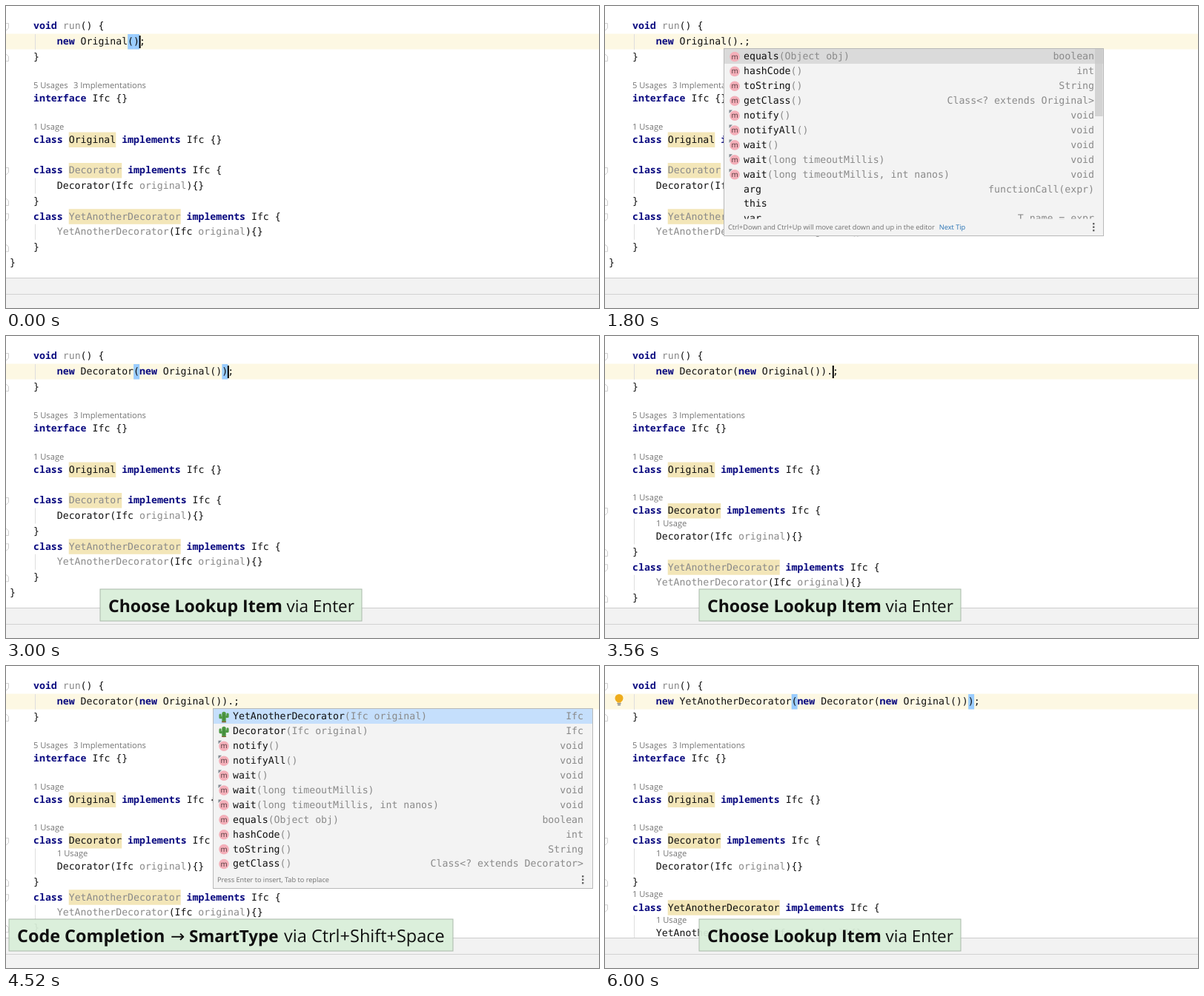
These frames come from a looping animation (800 px wide and 408 px high, 6280 ms). An HTML page:

```html
<!DOCTYPE html>
<html lang="en">
<head>
<meta charset="utf-8">
<title>Smart completion</title>
<style>
  html, body { margin: 0; width: 100%; height: 100%; overflow: hidden; background: #fff; }
  svg { display: block; }
  text { white-space: pre; text-rendering: geometricPrecision; fill: #101010; }
  .code { font: 13.2px "DejaVu Sans Mono", monospace; }
  .ui { font-family: "Open Sans", "DejaVu Sans", sans-serif; }
  .kw { font: 700 13.25px "Noto Sans Mono", "DejaVu Sans Mono", monospace; fill: #0a0a80; }
  .dim { fill: #8a8a8a; }
  .hint { font-size: 11.15px; fill: #757575; }
  .tip { font-size: 9.2px; fill: #707070; }
  .link { fill: #2470b3; }
</style>
</head>
<body>
<svg id="stage" viewBox="0 0 800 408" width="100%" height="100%"></svg>
<script>
const LOOP = 6280, TICK = 40;
const CW = 7.95, LEFT = 37, LINE = 20.75, HINT = 14, BASE = 4.4;
const stage = document.getElementById('stage');

// Banner parts: text, x offset, weight, size
const smartBanner = { x: 4, w: 599, parts: [
  ['Code Completion', 11, 700, 23.4], ['→', 218, 400, 23],
  ['SmartType', 243, 700, 22.4], ['via Ctrl+Shift+Space', 371, 400, 23.5]] };
const chooseBanner = { x: 127, w: 353, parts: [
  ['Choose Lookup Item', 11, 700, 23.05], ['via Enter', 251.5, 400, 22.5]] };

const once = 'new Original()';
const twice = `new Decorator(${once})`;
const thrice = `new YetAnotherDecorator(${twice})`;

// Each row: icon (m method, f final method, c constructor), name, arguments, type
const objectRows = cls => [
  ['m', 'equals', '(Object obj)', 'boolean'],
  ['m', 'hashCode', '()', 'int'],
  ['m', 'toString', '()', 'String'],
  ['m', 'getClass', '()', `Class<? extends ${cls}>`]];
const finalRows = [
  ['f', 'notify', '()', 'void'],
  ['f', 'notifyAll', '()', 'void'],
  ['f', 'wait', '()', 'void'],
  ['f', 'wait', '(long timeoutMillis)', 'void'],
  ['f', 'wait', '(long timeoutMillis, int nanos)', 'void']];
const templates = [
  ['', 'arg', '', 'functionCall(expr)'],
  ['', 'this', '', ''],
  ['', 'var', '', 'T name = expr']];
const ctor = name => ['c', name, '(Ifc original)', 'Ifc'];

const basicList = (cls, tip, h = 252) => ({
  h, tip, tipY: 241, next: true, bar: true, pick: '#dadada',
  rows: [...objectRows(cls), ...finalRows, ...templates] });
const smartList = (cls, names) => ({
  h: 242, tip: 'Press Enter to insert, Tab to replace', tipY: 231, pick: '#c5dffc',
  rows: [...names.map(ctor), ...finalRows, ...objectRows(cls)] });

const tipA = 'Ctrl+Down and Ctrl+Up will move caret down and up in the editor';
const tipB = 'Click Ctrl+Shift+O to get relevant code examples from Quelta';

const steps = [
  [0, { code: once, caret: 1, used: 0, list: null, banner: null, bulb: 0 }],
  [520, { caret: 0 }],
  [680, { code: once + '.', caret: 1 }],
  [840, { list: basicList('Original', tipA) }],
  [1520, { caret: 0 }],
  [2000, { caret: 1, banner: smartBanner }],
  [2040, { list: basicList('Original', tipA, 242) }],
  [2120, { list: smartList('Original', ['Decorator', 'YetAnotherDecorator']) }],
  [2520, { caret: 0 }],
  [2760, { code: twice, caret: 1, list: null }],
  [2800, { banner: chooseBanner }],
  [3320, { code: twice + '.' }],
  [3480, { used: 1 }],
  [3600, { list: basicList('Decorator', tipB) }],
  [4000, { list: basicList('Decorator', tipB, 242), banner: { ...chooseBanner, x: 4 } }],
  [4080, { banner: smartBanner }],
  [4160, { list: smartList('Decorator', ['YetAnotherDecorator', 'Decorator']) }],
  [4520, { caret: 0 }],
  [4760, { code: thrice, caret: 1, list: null }],
  [4800, { banner: chooseBanner }],
  [5080, { used: 2 }],
  [5520, { caret: 0 }],
  [5680, { bulb: 1 }]];

const esc = s => s.replace(/&/g, '&amp;').replace(/</g, '&lt;');
const rect = (x, y, w, h, fill, more = '') =>
  `<rect x="${x}" y="${y}" width="${w}" height="${h}" fill="${fill}" ${more}/>`;
const path = (d, stroke, more = '') => `<path d="${d}" fill="none" stroke="${stroke}" ${more}/>`;
const text = (x, y, cls, body, more = '') =>
  `<text x="${x}" y="${y}" class="${cls}" ${more}>${body}</text>`;

// Keywords become bold, ~words~ become grey
const paint = s => esc(s)
  .replace(/\b(void|new|interface|class|implements)\b/g, '<tspan class="kw">$1</tspan>')
  .replace(/~(.+?)~/g, '<tspan class="dim">$1</tspan>');
const code = (y, s, col = 0) => text(LEFT + col * CW, y + BASE, 'code', paint(s));
const hint = (y, s, x = LEFT) => text(x, y - 14, 'ui hint', s);
const guide = (a, b) => path(`M39.5 ${a}V${b}`, '#dedede');
const foldOpen = y => path(`M0 ${y - 4.5}H3.5V${y + 2}L0 ${y + 5}`, '#cfcfcf');
const foldEnd = y => path(`M0 ${y + 5.5}H3.5V${y - 1}L0 ${y - 4}`, '#cfcfcf');

function classHead(y, name, used) {
  return rect(LEFT + 6 * CW, y - 10, name.length * CW, 20.5, '#f3e6b8') +
    code(y, `class ${used ? name : `~${name}~`} implements Ifc {`);
}

function decorator(y, name, hinted, ctorUsed) {
  const gap = hinted ? HINT : 0, body = y + gap + LINE, end = body + LINE;
  const label = ctorUsed ? name : `~${name}~`;
  return (hinted ? hint(y, '1 Usage') + hint(body, '1 Usage', 69) : '') +
    classHead(y, name, hinted) + guide(y + 10.5, end - 10) +
    code(body, label + '(Ifc ~original~){}', 4) + code(end, '}') +
    foldOpen(y + 1) + foldEnd(end + 0.5);
}

function matchParens(s) {
  if (!s.endsWith(')')) return '';
  let i = s.length - 1, depth = 1;
  while (depth) depth += { ')': 1, '(': -1 }[s[--i]] || 0;
  return [i, s.length - 1]
    .map(c => rect(LEFT + (c + 4) * CW, 38, CW, 20.5, '#99ccff')).join('');
}

function editor(s) {
  const d = 222 + (s.used > 0 ? HINT : 0);
  const y = d + 3 * LINE + (s.used > 0 ? HINT : 0) + (s.used > 1 ? HINT : 0);
  const tail = y + 3 * LINE + (s.used > 1 ? HINT : 0);
  return rect(0, 37.5, 800, 21, '#fdf8e3') + guide(38, 59) + matchParens(s.code) +
    code(27, 'void ~run~() {') + code(48, s.code + ';', 4) + code(68.5, '}') +
    foldOpen(28) + foldEnd(69) +
    hint(124.5, '5 Usages') + hint(124.5, '3 Implementations', 91) +
    code(124.5, 'interface Ifc {}') +
    hint(180.5, '1 Usage') + classHead(180.5, 'Original', true) +
    code(180.5, '}', 31) +
    decorator(d, 'Decorator', s.used > 0, true) +
    decorator(y, 'YetAnotherDecorator', s.used > 1, s.used > 1) +
    text(5, tail + BASE, 'code', '}') +
    (s.caret ? rect(caretX(s) - 0.5, 40, 2, 17, '#000') : '');
}

const caretX = s => LEFT + (s.code.length + 4) * CW;

function icon(kind, y) {
  if (!kind) return '';
  if (kind === 'c') {
    const round = 'stroke-linecap="round" stroke-linejoin="round"';
    return path(`M14 ${y + 5}V${y - 4}`, '#4f9a45', `stroke-width="5.5" ${round}`) +
      path(`M9 ${y - 2.5}V${y + 1.2}H14M19 ${y - 3.5}V${y}H14`, '#4f9a45', `stroke-width="3.2" ${round}`) +
      path(`M14 ${y + 5}V${y - 4}`, '#3a7a34', 'stroke-width="1"') +
      path(`M11 ${y + 7}H17`, '#8a6238', 'stroke-width="1.4"');
  }
  return `<circle cx="14" cy="${y}" r="6.8" fill="#f4afb9"/>` +
    text(14, y + 3, 'ui', 'm', 'font-size="9.8" text-anchor="middle" style="fill:#4d3438"') +
    (kind === 'f' ? `<path d="M6.5 ${y - 7.5}h4.5l-4.5 4.5z" fill="#808890"/>` : '');
}

function popup(s) {
  const p = s.list;
  if (!p) return '';
  const rows = p.rows.map(([kind, name, args, type], i) => {
    const y = 10 + 19.9 * i;
    return icon(kind, y + 0.5) +
      text(26, y + BASE, 'code', name + `<tspan class="dim">${args}</tspan>`) +
      text(499, y + BASE, 'code dim', esc(type), 'text-anchor="end"');
  }).join('');
  const next = p.next ? '<tspan class="link" dx="6">Next Tip</tspan>' : '';
  const dots = [-4.5, 0, 4.5].map(o => rect(497, p.tipY + o - 1.5, 2.4, 2.4, '#666')).join('');
  const w = 513, h = p.h + 2;
  return `<svg x="${Math.round(caretX(s) - 28)}" y="57" width="${w}" height="${h}" viewBox="-1 -1 ${w} ${h}">` +
    rect(0, 0, 511, p.h, '#f3f3f3') + rect(0, 0, 511, 20, p.pick) +
    `<svg width="511" height="229.5">${rows}</svg>` +
    (p.bar ? rect(500, 0, 10.5, 91, '#c9c9c9', 'fill-opacity=".75"') : '') +
    text(5, p.tipY + 3.4, 'ui tip', p.tip + next) + dots +
    rect(-0.5, -0.5, w - 1, h - 1, 'none', 'stroke="#b9b9b9"') + '</svg>';
}

function banner(b, alpha) {
  if (!b) return '';
  return `<g opacity="${alpha}">` +
    rect(b.x, 342, b.w, 43, '#d9eed9', 'fill-opacity=".94" stroke="#a9b9a9"') +
    b.parts.map(([s, x, weight, size]) =>
      text(b.x + x, 373, 'ui', s, `font-size="${size}" font-weight="${weight}"`)).join('') + '</g>';
}

const statusBar = rect(0, 367, 800, 41, '#f2f2f2') +
  rect(0, 367, 800, 1, '#cdcdcd') + rect(0, 389, 800, 1, '#d2d2d2');

const bulb = '<circle cx="19" cy="43.5" r="5.5" fill="#eeac1c"/>' +
  rect(16.5, 46, 5, 3.5, '#eeac1c') + rect(16.5, 50, 5, 1.2, '#777') + rect(17, 52, 4, 1.2, '#777');

let shown = -1;
function draw(t) {
  if (t === shown) return;
  shown = t;
  const s = Object.assign({}, ...steps.filter(([at]) => at <= t).map(([, change]) => change));
  const alpha = Math.min(1, (t - 1920) / 320);
  stage.innerHTML = rect(0, 0, 800, 408, '#fff') + editor(s) + (s.bulb ? bulb : '') +
    statusBar + popup(s) + banner(s.banner, alpha);
}

const start = performance.now();
function frame() {
  const t = (performance.now() - start) % LOOP;
  draw(Math.floor(t / TICK) * TICK);
  requestAnimationFrame(frame);
}
frame();
</script>
</body>
</html>
```
